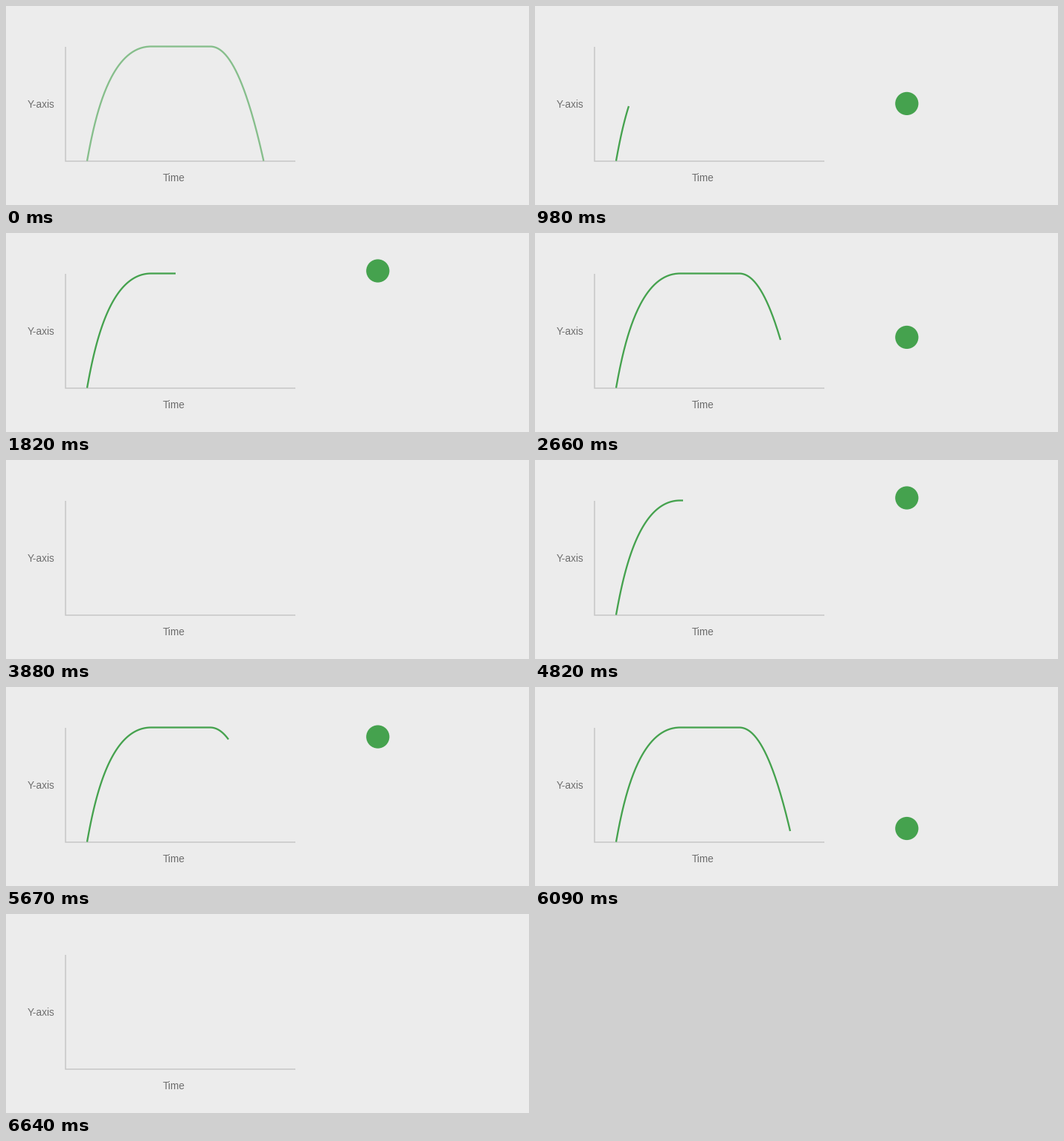
Recreate the animation shown at these times as a matplotlib script. Size 703 by 268 pixels, loop 6860 ms.

```python
import numpy as np
import matplotlib.pyplot as plt
from matplotlib.animation import FuncAnimation
from matplotlib.patches import Circle

W, H, DPI = 703, 268, 64
PT = 72 / DPI                      # points per pixel
LOOP, TICK = 6860, 20              # ms

BACK, AXIS, LABEL, GREEN = "#ececec", "#c6c6c6", "#6e6e6e", "#45a24e"
TOP, BASE = 54.5, 208.6
X0, X1, X2, X3 = 109, 195, 274, 346.3
BALL_X, BALL_R, BALL_LIFT = 499.8, 15.6, 3.5

# The motion is held in short steps: step number -> start time in ms.
STEP_KEYS = [0, 1, 5, 7, 12, 13, 19, 20, 21, 23, 24, 28, 29,
             35, 36, 41, 42, 43, 44, 45, 47, 48]
TIME_KEYS = [0, 150, 680, 980, 1670, 1820, 2660, 2780, 2930, 3210, 3360, 3880,
             4000, 4820, 4970, 5670, 5820, 5940, 6090, 6220, 6520, 6640]
STARTS = np.round(np.interp(np.arange(49), STEP_KEYS, TIME_KEYS), -1)

# Each run: ball's first and last step, then fading and blank steps, then the tip's x keys.
RUNS = [
    dict(first=6, last=20, fade=23, blank=24,
         steps=[6, 7, 19, 20, 21], xs=[X0, 126, 330, 341.5, X3]),
    dict(first=29, last=44, fade=47, blank=48,
         steps=[29.6, 35, 41, 43, 44, 45], xs=[X0, 199, 299, 333, 343, X3]),
]


def bezier(p0, p1, p2, p3, n=80):
    t = np.linspace(0, 1, n)[:, None]
    p0, p1, p2, p3 = map(np.array, (p0, p1, p2, p3))
    return ((1 - t) ** 3 * p0 + 3 * t * (1 - t) ** 2 * p1
            + 3 * t ** 2 * (1 - t) * p2 + t ** 3 * p3)


def build_curve():
    rise = bezier((X0, BASE), (119, 153), (139, TOP), (X1, TOP))
    u = np.linspace(0, 1, 80)
    fall = np.column_stack([X2 + (X3 - X2) * u, TOP + (BASE - TOP) * u ** 2.13])
    return np.vstack([rise, fall]).T


CX, CY = build_curve()


def state(ms):
    """Return tip x (None when blank), curve opacity and ball visibility."""
    step = np.searchsorted(STARTS, ms, side="right") - 1
    if step == 0:
        return X3, 0.61, False
    for run in RUNS:
        if run["first"] <= step < run["blank"]:
            x = np.interp(step, run["steps"], run["xs"])
            alpha = 0.61 if step >= run["fade"] else 1
            return x, alpha, step <= run["last"]
    return None, 1, False


fig = plt.figure(figsize=(W / DPI, H / DPI), dpi=DPI, facecolor=BACK)
ax = fig.add_axes([0, 0, 1, 1])
ax.set_xlim(0, W)
ax.set_ylim(H, 0)
ax.axis("off")

ax.plot([80, 80, 389], [55, 209, 209], color=AXIS, lw=1.5 * PT, snap=False,
        solid_capstyle="butt", solid_joinstyle="miter")
for x, y, word in [(47.5, 136.8, "Y-axis"), (225.5, 236.2, "Time")]:
    ax.text(x, y, word, color=LABEL, family="Liberation Sans",
            size=13.6 * PT, ha="center", va="baseline")

curve, = ax.plot([], [], color=GREEN, lw=2.3 * PT, solid_capstyle="butt",
                 solid_joinstyle="round", snap=False)
ball = ax.add_patch(Circle((BALL_X, BASE), BALL_R, color=GREEN, lw=0, visible=False))


def draw(i):
    x, alpha, moving = state(i * TICK + TICK / 2)
    ball.set_visible(moving)
    if x is None:
        curve.set_data([], [])
        return curve, ball
    y = np.interp(x, CX, CY)
    done = CX < x
    curve.set_data(np.append(CX[done], x), np.append(CY[done], y))
    curve.set_alpha(alpha)
    lift = BALL_LIFT * min(1, (x - X0) / 5)
    ball.center = BALL_X, y - lift
    return curve, ball


anim = FuncAnimation(fig, draw, frames=LOOP // TICK, interval=TICK,
                     init_func=lambda: draw(0), repeat=True, repeat_delay=0, blit=True)
plt.show()
```
